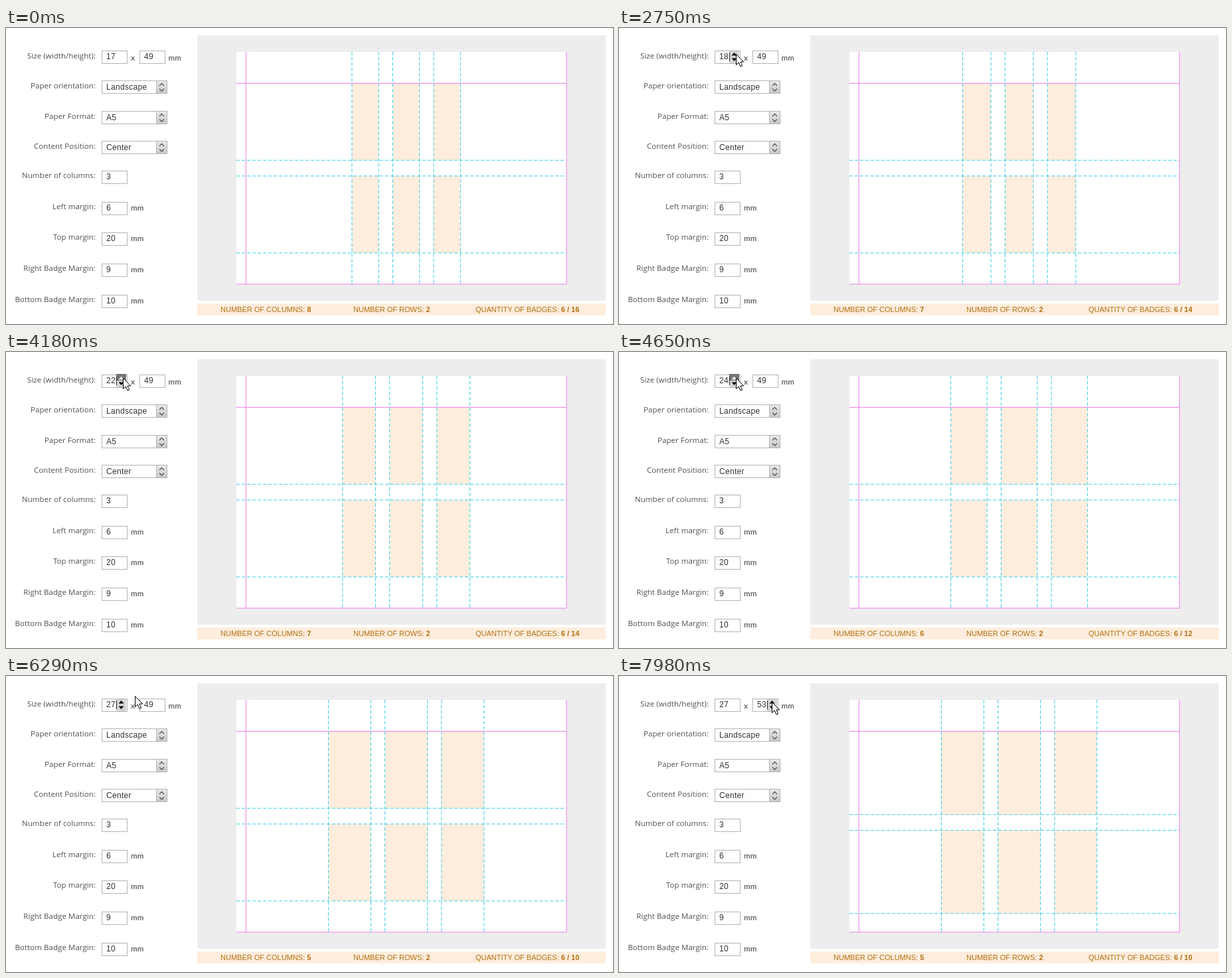
An HTML page that plays this animation: 914x446 px, repeating every 8 s.

```html
<!DOCTYPE html>
<html lang="en">
<head>
<meta charset="utf-8">
<title>Badge sheet settings</title>
<style>
  html, body { margin: 0; width: 100%; height: 100%; overflow: hidden; background: #fff; }
  svg { display: block; }
  .box, .crisp { shape-rendering: crispEdges; }
  .box { fill: #fff; stroke: #b4b4b4; }
  .label { font: 11.5px "Open Sans", sans-serif; letter-spacing: .05px; fill: #505050; text-anchor: end; }
  .unit { font: bold 11.5px Lato, sans-serif; fill: #666; }
  .value { font: 12px "Liberation Sans", Arial, sans-serif; letter-spacing: .3px; fill: #333; }
  .total { font: 11px "Liberation Sans", Arial, sans-serif; fill: #b06f10; }
  .total tspan { font-weight: bold; }
  .hint text { font: bold 12px "Liberation Sans", Arial, sans-serif; letter-spacing: .3px; text-anchor: middle; }
  .margin { fill: none; stroke: #ea7ce8; }
  .guide { fill: none; stroke: #35cfe6; stroke-dasharray: 5 3; }
  .badge { fill: #feeddd; }
</style>
</head>
<body>
<svg id="stage" width="914" height="446" viewBox="0 0 914 446">
  <defs>
    <linearGradient id="knob" x2="0" y2="1">
      <stop stop-color="#e8e8e8"/><stop offset="1" stop-color="#c9c9c9"/>
    </linearGradient>
  </defs>
  <rect class="crisp" x="288" y="11" width="615" height="400" fill="#ededed"/>
  <rect class="crisp" x="347" y="36" width="497" height="350" fill="#fff"/>
  <path id="badges" class="badge"/>
  <path id="guides" class="guide"/>
  <path id="margins" class="margin"/>
  <rect class="crisp" x="288" y="415" width="615" height="18" fill="#feeddd"/>
  <text class="total" x="323" y="428">NUMBER OF COLUMNS: <tspan id="cols"></tspan></text>
  <text class="total" x="523" y="428">NUMBER OF ROWS: <tspan>2</tspan></text>
  <text class="total" x="707" y="428">QUANTITY OF BADGES: <tspan id="count"></tspan></text>
  <g id="form"></g>
  <g id="spin">
    <rect class="crisp" x="0" y="35" width="15" height="18" fill="#d6d6d6"/>
    <rect id="press" class="crisp" x="0" y="33" width="15" height="10" fill="#757575"/>
    <path id="up" d="M3.5 41.5L7.5 37L11.5 41.5Z"/>
    <path d="M3.5 45.5L7.5 50L11.5 45.5Z"/>
    <path class="crisp" d="M.5 37V50" stroke="#222"/>
  </g>
  <g id="hint" class="hint">
    <rect class="box" x="151.5" y="54.5" width="31" height="24"/>
    <text x="167" y="71">20</text>
  </g>
  <path id="pointer" d="M.5 .5V16.5L4.3 13L7 19.2L9.6 18L6.9 12H11.7Z" fill="#fff" stroke="#000" stroke-linejoin="round"/>
</svg>
<script>
const LOOP = 8000;
const MM = 497 / 210;
const PAGE = { x: 347, y: 36, right: 844, bottom: 386 };
const LEFT = 6, TOP = 20, GAP_X = 9, GAP_Y = 10, COLS = 3, ROWS = 2;
const contentX = PAGE.x + LEFT * MM, contentY = PAGE.y + TOP * MM;
const $ = id => document.getElementById(id);

const vLine = x => `M${x} ${PAGE.y}V${PAGE.bottom}`;
const hLine = y => `M${PAGE.x} ${y}H${PAGE.right}`;
$('margins').setAttribute('d', vLine(contentX) + hLine(contentY) + vLine(PAGE.right) + hLine(PAGE.bottom));

// Form
const rows = [
  ['Size (width/height):', 46],
  ['Paper orientation:', 91, 'Landscape', 'select'],
  ['Paper Format:', 137, 'A5', 'select'],
  ['Content Position:', 182, 'Center', 'select'],
  ['Number of columns:', 226, COLS],
  ['Left margin:', 273, LEFT, 'mm'],
  ['Top margin:', 319, TOP, 'mm'],
  ['Right Badge Margin:', 366, GAP_X, 'mm'],
  ['Bottom Badge Margin:', 413, GAP_Y, 'mm']
];
const text = (cls, x, y, s, id = '') => `<text class="${cls}" id="${id}" x="${x}" y="${y}">${s}</text>`;
const frame = (x, y, w) => `<rect class="box" x="${x + .5}" y="${y + .5}" width="${w}" height="19"/>`;
const input = (x, y, s, id) => frame(x, y - 13, 38) + text('value', x + 7, y, s, id);
const select = (x, y, s) => frame(x, y - 14, 98) + text('value', x + 7, y, s)
  + `<rect class="crisp" x="227" y="${y - 13}" width="15" height="18" fill="url(#knob)"/>
  <path class="crisp" d="M226.5 ${y - 13}v18" stroke="#b4b4b4"/>
  <path d="M231 ${y - 6}l3.5 -3.5l3.5 3.5M231 ${y - 1.5}l3.5 3.5l3.5 -3.5" fill="none" stroke="#555" stroke-width="1.3"/>`;

$('form').innerHTML = rows.map(([name, y, val, kind], i) => {
  const label = text('label', 135, y, name);
  if (!i) {
    return label + input(144, 47, '', 'wide') + text('unit', 188, 49, 'x')
      + input(201, 47, '', 'high') + text('unit', 244.5, 49, 'mm');
  }
  if (kind === 'select') return label + select(144, y + 2, val);
  return label + input(144, y + 2, val) + (kind ? text('unit', 188, y + 2, kind) : '');
}).join('');

// Spinner clicks: [press, release]; the sheet follows on release
const wideClicks = [[2670, 2750], [3070, 3150], [3390, 3470], [3690, 3860], [4180, 4260],
  [4420, 4650], [4650, 4800], [5040, 5120], [5350, 5500], [5820, 5900]];
const highClicks = [[7210, 7290], [7370, 7450], [7600, 7680], [7830, 7980]];
const spun = (base, clicks, t) => ({
  value: base + clicks.filter(c => c[0] <= t).length,
  drawn: base + clicks.filter(c => c[1] <= t).length
});

// Pointer moves, sampled in visible steps
const moves = [
  { start: 370, end: 1370, n: 11, pts: [[731, 343], [640, 290], [470, 200], [280, 110], [150, 62], [115, 50], [140, 45], [170, 42]] },
  { start: 1450, end: 2210, n: 8, pts: [[169, 40], [172, 38], [175, 41], [176, 39]] },
  { start: 6070, end: 6830, n: 9, pts: [[181, 36], [196, 30], [214, 29], [225, 34], [230, 39]] }
];

function along(pts, u) {
  const last = pts.length - 1;
  const i = Math.min(last - 1, Math.floor(u * last)), f = u * last - i;
  const at = k => pts[Math.max(0, Math.min(last, k))];
  return [0, 1].map(k => {
    const [a, b, c, d] = [at(i - 1)[k], at(i)[k], at(i + 1)[k], at(i + 2)[k]];
    return b + f / 2 * (c - a + f * (2 * a - 5 * b + 4 * c - d + f * (3 * (b - c) + d - a)));
  });
}

function pointerAt(t) {
  const m = moves.filter(m => m.start <= t).pop();
  if (!m) return null;
  const u = Math.min(1, (t - m.start) / (m.end - m.start));
  return along(m.pts, Math.floor(u * m.n + 1e-6) / m.n).map(Math.round);
}

function drawSheet(w, h) {
  const x0 = (contentX + PAGE.right - (COLS * w + (COLS - 1) * GAP_X) * MM) / 2;
  const span = (from, size, gap, i) => {
    const a = from + i * (size + gap) * MM;
    return [a, a + size * MM];
  };
  let badges = '', guides = '';
  for (let c = 0; c < COLS; c++) {
    const [l, r] = span(x0, w, GAP_X, c);
    guides += vLine(l) + vLine(r);
    for (let k = 0; k < ROWS; k++) {
      const [a, b] = span(contentY, h, GAP_Y, k);
      badges += `M${l} ${a}H${r}V${b}H${l}Z`;
    }
  }
  for (let k = 0; k < ROWS; k++) {
    guides += span(contentY, h, GAP_Y, k).filter(y => y > contentY).map(hLine).join('');
  }
  $('badges').setAttribute('d', badges);
  $('guides').setAttribute('d', guides);
  const fit = Math.floor((210 - LEFT + GAP_X) / (w + GAP_X));
  $('cols').textContent = fit;
  $('count').textContent = `${COLS * ROWS} / ${fit * ROWS}`;
}

const show = (id, on) => $(id).setAttribute('visibility', on ? 'visible' : 'hidden');
let sheet = '';

function render(t) {
  const wide = spun(17, wideClicks, t), high = spun(49, highClicks, t);
  $('wide').textContent = wide.value;
  $('high').textContent = high.value;
  const key = wide.drawn + 'x' + high.drawn;
  if (key !== sheet) drawSheet(wide.drawn, high.drawn);
  sheet = key;

  const down = wide.value > wide.drawn || high.value > high.drawn;
  show('spin', t >= 2670);
  show('press', down);
  $('spin').setAttribute('transform', `translate(${t < 6910 ? 166 : 223})`);
  $('up').setAttribute('fill', down ? '#fff' : '#000');
  show('hint', t >= 3540 && t < 3930);

  const p = pointerAt(t);
  show('pointer', p);
  if (p) $('pointer').setAttribute('transform', `translate(${p})`);
}

const begin = performance.now();
function tick() {
  render((performance.now() - begin) % LOOP);
  requestAnimationFrame(tick);
}
tick();
</script>
</body>
</html>
```
